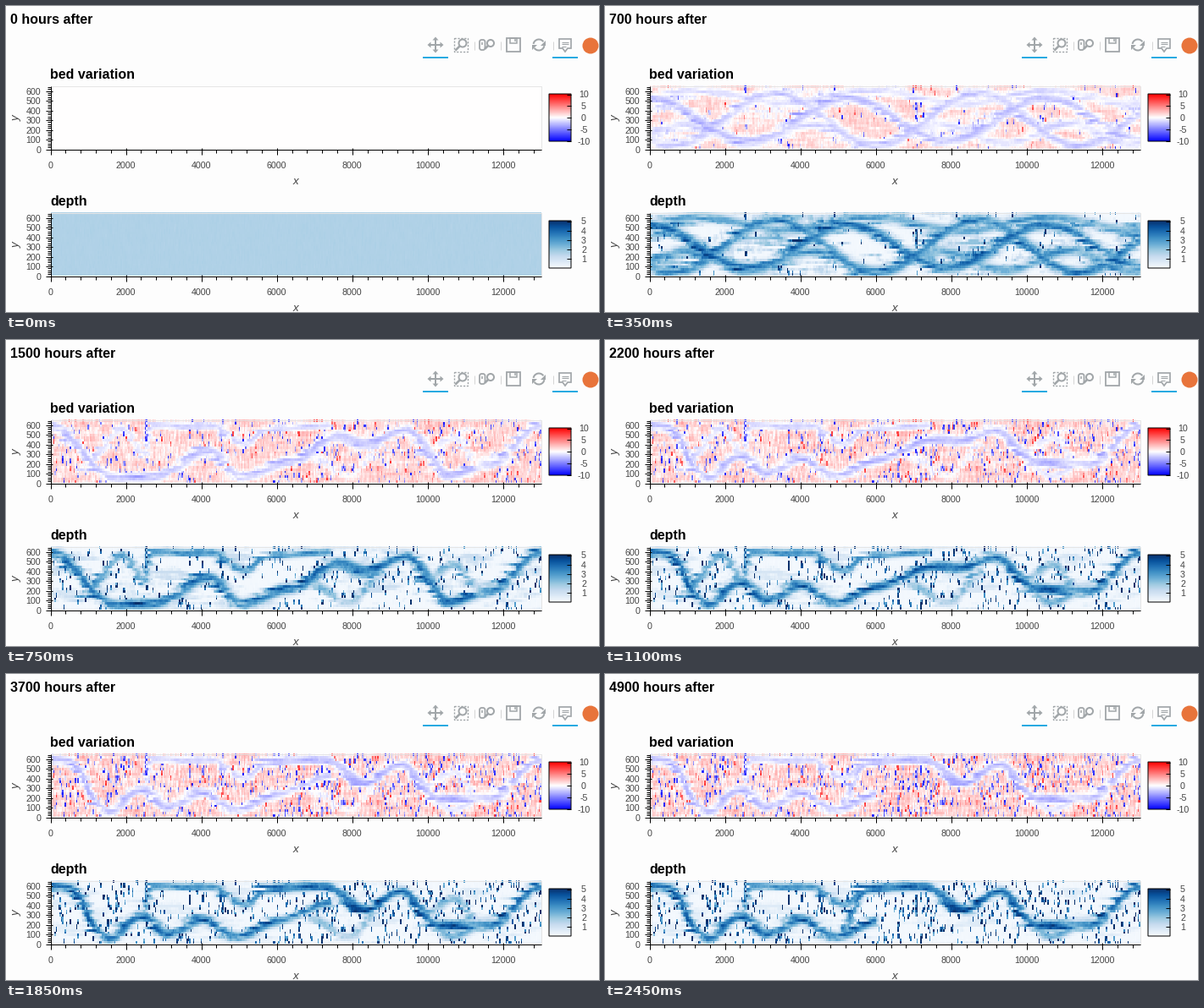
A matplotlib script that plays this animation: 700 px wide and 362 px high, repeating every 2.5 s.

```python
import numpy as np
import matplotlib.pyplot as plt
from matplotlib.animation import FuncAnimation
from matplotlib.patches import Arc, Circle, FancyBboxPatch, Polygon, Rectangle

W, H, DPI = 700, 362, 100
FRAMES, INTERVAL = 50, 50
NX, NY = 386, 26
LEFT, RIGHT, TALL = 52.5, 631.5, 74.5
KX, KY = (RIGHT - LEFT) / 13, TALL / 6.5  # pixels per 1000 along, per 100 across
PX = 72 / DPI
PAPER, GREY = "#fdfdfd", "#a1a6a9"

plt.rcParams["font.family"] = "Liberation Sans"
rng = np.random.default_rng(11)


# ---------- river model ----------
def noise(rx, ry):
    """Random field smeared by a periodic box, with unit spread."""
    f = rng.normal(size=(NY, NX))
    f = sum(np.roll(f, k, 1) for k in range(-rx, rx + 1))
    f = sum(np.roll(f, k, 0) for k in range(-ry, ry + 1))
    return (f - f.mean()) / f.std()


streak, cloud, grain = noise(6, 0), noise(14, 1), noise(0, 1)

# streaky warp of the grid makes the banks ragged along the flow
gx, gy = np.meshgrid((np.arange(NX) + 0.5) / NX * 13 * KX,
                     (np.arange(NY) + 0.5) / NY * TALL)
gx = gx + 3 * streak


def carve(x, y, depth, width):
    """Depth of a channel along a line; x in thousands, y in hundreds."""
    d2 = np.full((NY, NX), 1e9)
    for px, py in zip(x * KX, y * KY):
        d2 = np.minimum(d2, (gx - px)**2 + (gy - py)**2)
    return depth * np.exp(-(d2 / width**2)**1.25)


def bends(*pts):
    """Line that eases from one bend to the next."""
    bx, by = np.array(pts, float).T
    x = np.arange(bx[0], bx[-1], 0.05)
    k = np.clip(np.searchsorted(bx, x, side="right") - 1, 0, len(bx) - 2)
    u = (x - bx[k]) / (bx[k + 1] - bx[k])
    return x, by[k] + (by[k + 1] - by[k]) * (1 - np.cos(np.pi * u)) / 2


def wave(crest, length, mean, swing):
    x = np.arange(0, 13, 0.05)
    return x, mean + swing * np.cos(2 * np.pi * (x - crest) / length)


ALWAYS = 99
reaches = []  # (start, end, depth field)


def reach(start, end, depth, width, path):
    reaches.append((start, end, carve(*path, depth, width)))


# young braid: regular strands crossing one another
for crest, length, mean, swing, depth in (
        (0, 5.25, 3, 2.2, 3.4), (3.3, 5.4, 3, 2.7, 3.1),
        (0.9, 3.4, 1.5, 1, 2.5), (1.3, 4.6, 5.3, 0.7, 2.4)):
    reach(-9, 11, depth, 6.5, wave(crest, length, mean, swing))

# main channel before and after it shifts
reach(11, 18.5, 3.4, 6.5, bends((0, 5.9), (1.7, .5), (2.7, .6), (4.2, 3.3), (5, .6), (6.4, 2.2),
                                (7.6, 4.8), (8.4, 4), (9.4, 5.5), (10.6, .8), (11.6, 1.9), (13, 6)))
reach(18.5, ALWAYS, 3.6, 6, bends((0, 5.9), (.5, 5.7), (1.5, .5), (2.4, 2.8), (3.1, 1), (4, 2.5),
                                  (4.9, .7), (6, 2.3)))
reach(18.5, 26, 3.6, 6, bends((5.9, 2.3), (7.6, 4.5), (8.3, 4.3), (9.1, 5.4), (10.3, 2.1),
                              (11.6, 1.9), (13, 5.9)))
reach(26, ALWAYS, 3.7, 6, bends((5.6, 5.6), (7.2, 5.9), (8.4, 3.5), (9.25, 5.4), (10.3, 1.8),
                                (11.6, 1.9), (13, 5.9)))
# side channels, cut-offs and old loops
reach(12, ALWAYS, 3, 4.3, bends((2.45, 2.8), (2.7, 5.9), (4.3, 5.8), (5.1, 4), (5.8, 5.5), (7.4, 5.9)))
reach(11, 26, 2.5, 5, bends((.9, 1.5), (1.9, 5.6), (2.5, 2.8)))
reach(26, 44, 3, 5, bends((5.9, 2.3), (7.5, 4.2)))
reach(43, ALWAYS, 3.4, 5, bends((4.9, .7), (5.8, 5.4)))
reach(11, 40, 1.6, 4.5, bends((6.9, 2.6), (7.9, .7), (8.9, 4)))
reach(12, 44, 2.2, 4.5, bends((9.8, 3), (10.7, 4.6), (11.4, 2)))
reach(18, ALWAYS, 2.2, 4.5, bends((9.9, 2.2), (10.7, .7), (11.5, 1.9)))

cluster = 0.7 + 0.5 * np.clip(noise(16, 4) + 0.6, 0, 2)


def specks():
    """Birth level of each speck; a speck is two cells tall."""
    s = rng.random((NY, NX)) / cluster
    for x, y in ((2.52, 5.4), (7.05, 3.9)):  # two early scour columns
        c, r = int(x / 13 * NX), int(y * 4)
        s[r - 4:r + 4, c:c + 2] *= 0.02
    return np.minimum(s, np.roll(s, 1, 0))


pits, mounds = specks(), specks()
pit_depth = rng.uniform(2.2, 6.5, (NY, NX))
pit_bed = -rng.uniform(0.5, 9, (NY, NX))
mound_bed = rng.uniform(3, 8, (NY, NX))


def fields(i):
    """Bed variation and depth after i * 100 hours."""
    grown = min(1, i / 6)
    age = 1 - np.exp(-(i / 16)**1.5)
    flow = np.zeros((NY, NX))
    for start, end, field in reaches:
        w = np.clip((i - start) / 6 + 0.5, 0, 1) * np.clip((end - i) / 6 + 0.5, 0, 1)
        if w > 0:
            np.maximum(flow, w * field, out=flow)
    flow = 1.6 * (1 - grown) + grown * flow
    haze = 0.25 + 0.7 * np.exp(-max(0, i - 7) / 8)
    depth = flow * (1 + 0.16 * grown * streak) + 0.02 * grain
    depth += grown * (0.1 + haze * np.clip(cloud + 0.4 * streak, 0, 2) * (flow < 1.6))
    bed = 1.84 * (i > 0) - 1.15 * np.clip(depth, 0, 5) * (i > 0)
    bed += grown * (0.35 + 0.35 * age) * (grain + 0.7 * streak) * (flow < 1.5)
    dry = flow < 1.2
    high = dry & (mounds < 0.028 * age)
    bed[high] = mound_bed[high]
    low = dry & (pits < 0.06 * age)
    bed[low], depth[low] = pit_bed[low], pit_depth[low]
    return bed, depth


# ---------- page ----------
fig = plt.figure(figsize=(W / DPI, H / DPI), dpi=DPI, facecolor=PAPER)
ax = fig.add_axes([0, 0, 1, 1])
ax.axis("off")


def line(xs, ys, color="black", w=1):
    ax.plot(xs, ys, color=color, lw=w * PX, solid_capstyle="butt")


def label(x, y, s, size=10.67, color="#444444", **kw):
    return ax.text(x, y, s, fontsize=size * PX, color=color, va="baseline", **kw)


def box(x, y, w, h, color, lw=1, **kw):
    ax.add_patch(Rectangle((x, y), w, h, fc="none", ec=color, lw=lw * PX, **kw))


def picture(data, x0, x1, top, bottom, cmap, lo, hi):
    return ax.imshow(data, cmap=cmap, vmin=lo, vmax=hi, origin="lower", aspect="auto",
                     extent=(x0, x1, bottom, top), interpolation="nearest", zorder=1)


def panel(top, title, cmap, lo, hi, step):
    base = top + TALL
    label(52, top - 9, title, 16, "black", weight="bold")
    img = picture(np.zeros((NY, NX)), LEFT, RIGHT, top, base, cmap, lo, hi)
    box(LEFT, top, RIGHT - LEFT, TALL, "#e5e5e5", zorder=2)
    line([LEFT, RIGHT], [base, base])
    line([LEFT, LEFT], [top, base])
    for n in range(33):
        major = n % 5 == 0
        out, inside = (6, 2) if major else (4, 0)
        x, y = LEFT + n * 0.4 * KX, base - n * 0.2 * KY
        line([x, x], [base - inside, base + out])
        line([LEFT - out, LEFT + inside], [y, y])
        if major:
            label(x, base + 22.5, str(n * 400), ha="center")
            label(41, y + 4, str(n * 20), ha="right")
    label(342, base + 41.5, "x", 13.33, style="italic", ha="center")
    ax.text(13, base - 37, "y", fontsize=13.33 * PX, color="#444444", style="italic",
            rotation=90, ha="center", va="center")
    # colour bar
    y0, tall = top + 9.5, 55.5
    picture(np.linspace(lo, hi, 256)[:, None], 641, 667, y0, y0 + tall, cmap, lo, hi)
    box(641, top + 9, 26, 56, "black", zorder=2, snap=False)
    for v in range(hi, lo - (lo < 0), -step):
        y = y0 + (hi - v) / (hi - lo) * tall
        line([662, 667], [y, y])
        label(682, y + 4, str(v), ha="center")
    return img


def lens(x, y, r, tail):
    """Magnifier with its handle at the lower left."""
    ax.add_patch(Circle((x, y), r, fc=PAPER, ec=GREY, lw=2 * PX, zorder=3))
    a = 0.7 * r
    line([x - a, x - a - tail], [y + a, y + a + tail], GREY, 2.6)


def toolbar():
    for x in (492, 645):
        ax.add_patch(Rectangle((x, 60), 30, 2, fc="#26aae1", ec="none"))
    for x in (552.5, 583.5, 645.5):
        line([x, x], [42, 52], "#d5d5d5")
    # pan
    cx, cy = 507, 46
    line([cx - 7, cx + 7], [cy, cy], GREY, 2)
    line([cx, cx], [cy - 7, cy + 7], GREY, 2)
    for dx, dy in ((1, 0), (-1, 0), (0, 1), (0, -1)):
        tip = np.array([[9.5, 0], [5.5, 3.5], [5.5, -3.5]]) @ [[dx, dy], [-dy, dx]]
        ax.add_patch(Polygon(tip + (cx, cy), fc=GREY, ec="none"))
    # box zoom
    box(529, 38, 16, 16, GREY, 1.4, ls=(0, (1.6, 1.2)))
    lens(539, 44, 4.5, 5.5)
    # wheel zoom
    ax.add_patch(FancyBboxPatch((561, 42), 2.5, 8, boxstyle="round,pad=2,rounding_size=2.5",
                                fc="none", ec=GREY, lw=1.8 * PX))
    line([562.2, 562.2], [43, 46], GREY, 1.6)
    lens(572, 44, 4, 4)
    # save
    box(591, 38, 16, 16, GREY, 1.8)
    box(595, 38, 8, 5.5, GREY, 1.5)
    line([600.5, 600.5], [39, 42], GREY, 1.5)
    # reset
    for start, s in ((190, 1), (10, -1)):
        ax.add_patch(Arc((629, 46), 13, 13, theta1=start, theta2=start + 135,
                         ec=GREY, lw=2 * PX))
        tip = np.array([[8, -5.5], [8, 0.5], [2, 0.5]]) * s
        ax.add_patch(Polygon(tip + (629, 46), fc=GREY, ec="none"))
    # hover
    ax.add_patch(Polygon([(653, 39), (667, 39), (667, 50), (663, 50), (660, 54),
                          (657, 50), (653, 50)], fc="none", ec=GREY, lw=1.7 * PX))
    for y, x1 in ((42.5, 664), (45, 664), (47.5, 661)):
        line([656, x1], [y, y], GREY, 1.1)
    ax.add_patch(Circle((690, 47), 9.5, fc="#e8743b", ec="none"))


clock = label(5, 21, "", 16, "black", weight="bold")
toolbar()
bed_img = panel(95, "bed variation", "bwr", -10, 10, 5)
depth_img = panel(245, "depth", "Blues", 0, 5, 1)
ax.set_xlim(0, W)
ax.set_ylim(H, 0)


def update(i):
    bed, depth = fields(i)
    bed_img.set_data(bed)
    depth_img.set_data(depth)
    clock.set_text(f"{i * 100} hours after")
    return bed_img, depth_img, clock


anim = FuncAnimation(fig, update, frames=FRAMES, interval=INTERVAL, repeat=True,
                     repeat_delay=0, blit=False)
plt.show()
```
